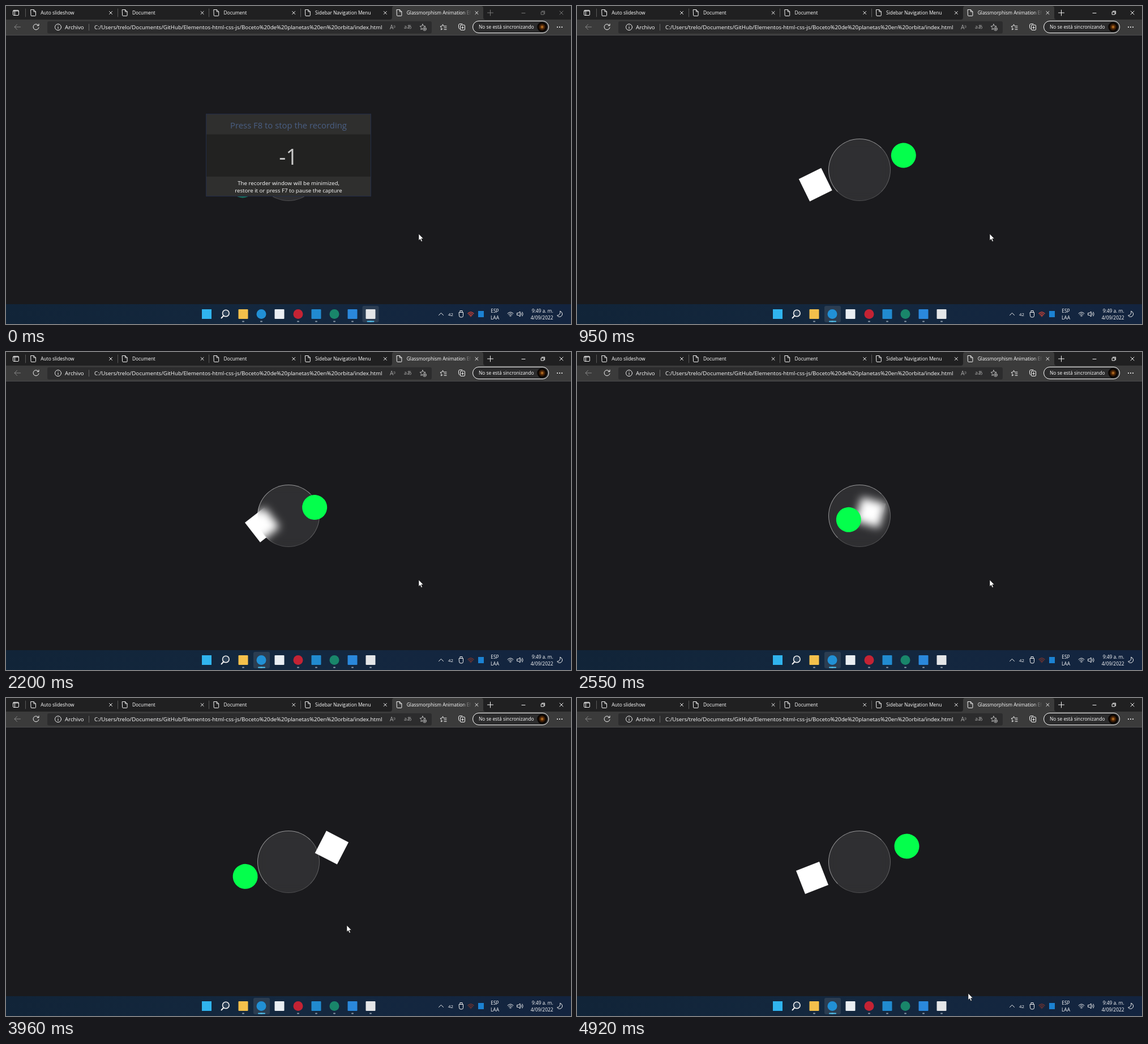
Write an HTML page that moves like this. It is 998 px wide and 561 px high and loops after 4.97 s.

```html
<!DOCTYPE html>
<html lang="es">
<head>
<meta charset="utf-8">
<title>Planetas en órbita</title>
<style>
html, body { margin: 0; width: 100%; height: 100%; overflow: hidden; background: #1a1a1d; }
svg, .planet, .glass { position: absolute; }
svg { left: 0; top: 0; width: 998px; height: 561px; font: 8.4px "Open Sans", "Noto Sans", sans-serif; fill: #fff; }
#top { z-index: 4; }
.planet { left: 0; top: 0; width: 44px; height: 44px; }
#ball { border-radius: 50%; }
#box { background: #fff; }
.glass {
  left: 444px; top: 234px; width: 110px; height: 110px; box-sizing: border-box; z-index: 2;
  border: 1px solid; border-color: #ffffff80 #ffffff40 #ffffff26 #ffffff80; border-radius: 50%;
  background: #ffffff18; backdrop-filter: blur(7.3px);
}
.line { fill: none; stroke: #f2f2f2; stroke-width: 1; stroke-linecap: round; stroke-linejoin: round; }
.dim { stroke: #858585; }
.big { font-size: 9.73px; }
.mid { text-anchor: middle; }
.end { text-anchor: end; }
</style>
</head>
<body>
<svg viewBox="0 0 998 561">
  <defs>
    <linearGradient id="bar"><stop stop-color="#112438"/><stop offset=".5" stop-color="#14283f"/><stop offset="1" stop-color="#13243f"/></linearGradient>
    <linearGradient id="fade"><stop offset=".86" stop-color="#3b3b3b" stop-opacity="0"/><stop offset="1" stop-color="#3b3b3b"/></linearGradient>
    <radialGradient id="glow"><stop stop-color="#d98a2b"/><stop offset=".35" stop-color="#5a2c08"/><stop offset=".8" stop-color="#080402"/></radialGradient>
    <path id="page" d="M-4-5.5H1L4.5-2V4.5Q4.5 5.5 3.5 5.5H-3Q-4 5.5-4 4.5ZM1-5.5V-2H4.5"/>
    <path id="cross" d="M-2.5-2.5 2.5 2.5M2.5-2.5-2.5 2.5"/>
    <path id="star" d="M0-5 1.5-1.7 5-1.3 2.4 1.1 3.1 4.7 0 2.9-3.1 4.7-2.4 1.1-5-1.3-1.5-1.7Z"/>
    <path id="wifi" d="M-5-1Q0-6 5-1M-3.3 1Q0-2.4 3.3 1M-1.6 2.8Q0 1.2 1.6 2.8M0 4V4.2"/>
  </defs>

  <path fill="#202021" d="M0 0H998V24H0Z"/>
  <path fill="#3b3b3b" d="M0 24H678Q682 24 682 20V4Q682 0 686 0H839Q843 0 843 4V20Q843 24 847 24H998V51H0Z"/>
  <path fill="#4b4b4d" d="M0 51H998V52H0Z"/>
  <g id="tabs"></g>
  <path fill="url(#fade)" d="M708 4H822V20H708Z"/>
  <g class="line">
    <rect x="12.5" y="7.5" width="10" height="9" rx="1.5"/><path d="M12.5 9H22.5M15.5 9V16"/>
    <path stroke="#5a5a5a" d="M34.5 5V19M197.5 5V19M358.5 5V19M520.5 5V19"/>
    <g id="buttons">
      <path d="M850.5 12H860.5M855.5 7V17M911 12.5H917"/>
      <path d="M945.5 10.5H950V15H945.5ZM946.5 9H951.5V14"/>
      <path d="M978 9 984 15M984 9 978 15"/>
    </g>
  </g>

  <rect x="73" y="27" width="679" height="21.5" rx="3" fill="#2c2c2d"/>
  <rect x="824.5" y="26.5" width="134" height="21" rx="10.5" fill="#2c2c2d" stroke="#fff"/>
  <circle cx="947" cy="37" r="8.7" fill="url(#glow)"/>
  <text class="big" x="104" y="41">Archivo</text>
  <text class="big" x="156" y="41">C:/Users/trelo/Documents/GitHub/Elementos-html-css-js/Boceto%20de%20planetas%20en%20orbita/index.html</text>
  <text x="835" y="40.3">No se está sincronizando</text>
  <text x="678" y="41" font-size="10" fill="#aaa">A<tspan dy="-3" font-size="6">))</tspan></text>
  <text x="703" y="40" font-size="9" fill="#aaa">aあ</text>
  <g class="line">
    <path class="dim" d="M25.5 37H15M19.5 32.5 15 37 19.5 41.5"/>
    <path d="M57.3 34.2A5 5 0 1 0 58 38M58 31.7V34.7H55"/>
    <circle cx="92" cy="37.3" r="5.5"/><path d="M92 37V40M92 34.6V34.7"/>
    <path stroke="#666" d="M146.5 32V43"/>
    <use href="#star" x="736" y="37" stroke="#bbb"/><circle cx="739.5" cy="40.5" r="3" fill="#2c2c2d" stroke="#bbb"/><path stroke="#bbb" d="M738 40.5H741M739.5 39V42"/>
    <path d="M771 40.5 768.5 42 769.2 38.5 767 36 770 35.5 771.5 32.5 773 35.5H778M774 38.5H778M774 41.5H778"/>
    <path d="M801 40.5Q799.5 39 799.5 37V34Q799.5 31.5 802 31.5H806"/><rect x="802.5" y="33.5" width="8" height="9" rx="1.5"/><path d="M804.5 38H808.5M806.5 36V40"/>
  </g>
  <path d="M973 36.5H975V38H973ZM977 36.5H979V38H977ZM981 36.5H983V38H981Z"/>

  <path fill="url(#bar)" d="M0 526H998V561H0Z"/>
  <rect id="active" y="529" width="29" height="29" rx="3" fill="#fff" fill-opacity=".1"/>
  <g id="apps"></g>
  <rect id="underline" y="555.5" width="13" height="2" rx="1" fill="#4cc2f0"/>
  <g class="line">
    <circle cx="388.3" cy="542" r="5.8" fill="#2c4056" stroke-width="1.6"/><path stroke-width="2" d="M384 546.7 380.5 550.5"/>
    <path d="M764.5 545.5 768.5 541.5 772.5 545.5"/>
    <path d="M800.5 540.5H807.5V546.5Q807.5 549 805 549H803Q800.5 549 800.5 546.5ZM802 540.5V537.5H806V540.5"/>
    <use id="signal" href="#wifi" x="821" y="543.5" stroke-width="1.4"/>
    <use href="#wifi" x="891" y="543.5"/>
    <path d="M903 541.7H905L908 539V548L905 545.3H903ZM910 541.7Q911.5 543.5 910 545.3M912 540Q914.5 543.5 912 547"/>
    <path d="M979 538.5A5 5 0 1 1 973.5 546Q979.5 545.5 979 538.5Z"/>
  </g>
  <rect x="834" y="538" width="10" height="11" fill="#1c82d2"/>
  <text class="mid" x="785.5" y="546.5" font-size="7.8">42</text>
  <text class="mid" x="863.5" y="541">ESP</text>
  <text class="mid" x="863.5" y="552.5">LAA</text>
  <text class="end" x="966.5" y="541">9:49 a. m.</text>
  <text class="end" x="966.5" y="552.5">4/09/2022</text>
</svg>

<div class="planet" id="ball"></div>
<div class="planet" id="box"></div>
<div class="glass"></div>

<svg id="top" viewBox="0 0 998 561">
  <g id="countdown" class="mid">
    <path fill="#2f2f2e" d="M353 190H645V336H353Z"/>
    <path fill="#222221" d="M353 226.5H645V301H353Z"/>
    <path fill="none" stroke="#222c48" d="M353.5 190.5H644.5V335.5H353.5Z"/>
    <text x="499" y="215.5" font-size="14.85" fill="#4a5f84">Press F8 to stop the recording</text>
    <text x="499" y="279.5" font-size="37.5" fill="#cacaca">-1</text>
    <text class="big" x="499" y="315.5">The recorder window will be minimized,</text>
    <text class="big" x="499" y="328.5">restore it or press F7 to pause the capture</text>
  </g>
  <path id="cursor" stroke="#111" stroke-width=".6" d="M0 0V11.5L2.6 9.2 4.5 13.5 6.4 12.7 4.6 8.5H8.2Z"/>
</svg>

<script>
const LOOP = 4970, LEG = 1961, START = 492;
const $ = id => document.getElementById(id);

$("tabs").innerHTML = ["Auto slideshow", "Document", "Document", "Sidebar Navigation Menu", "Glassmorphism Animation Ef"]
  .map((title, i) => {
    const x = 48 + i * 161.6;
    return `<use href="#page" class="line" x="${x}" y="12"/><text x="${x + 13.3}" y="15">${title}</text>
      <use href="#cross" class="line" x="${x + 137}" y="12"/>`;
  }).join("");

// x, colour, corner radius, running
$("apps").innerHTML = [
  [354.5, "#30b4ee", 0, 0], [419, "#f3c04b", 1, 1], [451, "#2190d5", 9, 1], [483, "#e9eef2", 1, 0], [516, "#c32334", 9, 1],
  [548, "#218bd0", 1, 1], [580, "#19866a", 9, 1], [612, "#2a88dc", 1, 1], [644, "#e4e6e8", 1, 1]
].map(([x, color, radius, running]) =>
  `<rect x="${x - 8.5}" y="535" width="17" height="17" rx="${radius}" fill="${color}"/>` +
  (running ? `<rect x="${x - 2}" y="555.5" width="4" height="2" rx="1" fill="#8c9aa8"/>` : "")
).join("");

// time, x, y
const cursorPath = [
  [3400, 729, 402], [3500, 715, 432], [3640, 650, 520], [3740, 640, 545], [3850, 592, 468],
  [3960, 602, 401], [4150, 655, 460], [4350, 712, 543], [4470, 691, 521]
];

function cursorAt(t) {
  const i = cursorPath.findIndex(point => point[0] > t);
  if (i < 1) return cursorPath.at(i).slice(1);
  const [a, b] = [cursorPath[i - 1], cursorPath[i]];
  const k = (t - a[0]) / (b[0] - a[0]);
  return [a[1] + (b[1] - a[1]) * k, a[2] + (b[2] - a[2]) * k];
}

// cubic-bezier(.42, 0, .58, 1)
function easeInOut(x) {
  let low = 0, high = 1, u;
  for (let i = 0; i < 20; i++) {
    u = (low + high) / 2;
    const v = 1 - u;
    if (1.26 * u * v * v + 1.74 * u * u * v + u ** 3 < x) low = u; else high = u;
  }
  return u * u * (3 - 2 * u);
}

// Planets pass behind the glass going right and in front of it going left.
function orbit(planet, turns) {
  const leg = Math.floor(turns), p = easeInOut(turns - leg), back = leg % 2;
  const side = (2 * p - 1) * (back ? -1 : 1);
  planet.style.transform = `translate(${477 + 109.6 * side}px, ${267.4 - 36.5 * side}px) rotate(${180 * p}deg)`;
  planet.style.zIndex = back ? 3 : 1;
}

function step(t) {
  const late = t < 3110 ? 0 : t < 4400 ? 10 : 20;
  return Math.floor((t - late) / 50) * 50 + late;
}

function draw(now) {
  const t = step(now % LOOP), counting = t < 50, turns = (t + START) / LEG;
  orbit($("ball"), turns);
  orbit($("box"), turns + 1);
  $("ball").style.background = counting ? "#176f5e" : "#04ff4c";
  $("countdown").style.display = counting ? "" : "none";
  $("buttons").style.stroke = counting ? "#777" : "";
  $("active").setAttribute("x", counting ? 629.5 : 437);
  $("underline").setAttribute("x", counting ? 637.5 : 445);
  $("signal").style.stroke = t < 2000 ? "#cf4436" : "#74352f";
  $("cursor").setAttribute("transform", `translate(${cursorAt(t)})`);
  requestAnimationFrame(draw);
}
requestAnimationFrame(draw);
</script>
</body>
</html>
```
